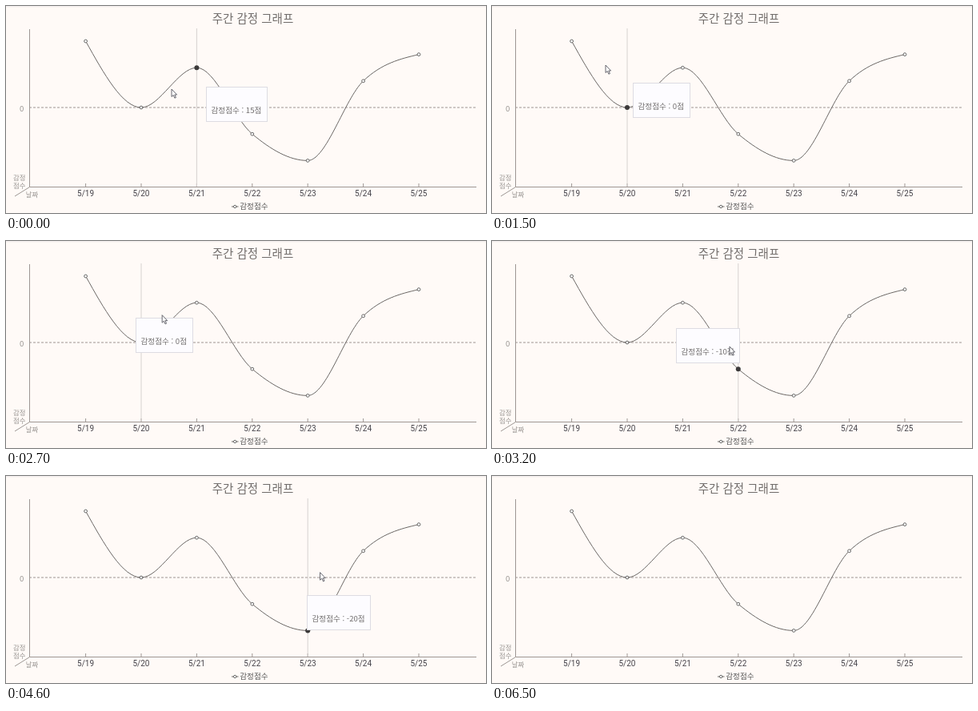
Recreate the animation shown at these times as an HTML page. Size 600 px wide and 259 px high, loop 6.6 s.

```html
<!DOCTYPE html>
<html lang="ko">
<head>
<meta charset="utf-8">
<title>주간 감정 그래프</title>
<style>
  html, body { margin: 0; width: 100%; height: 100%; overflow: hidden; background: #fffaf7; }
  svg { display: block; width: 600px; height: 259px; }
  text { font: 300 9.6px "Noto Sans CJK KR", "Noto Sans CJK", Roboto, sans-serif; fill: #555; }
  .mid { text-anchor: middle; }
  .title { font-size: 14.5px; fill: #706c6a; }
  .day { font: 400 10px Roboto, "Noto Sans", sans-serif; fill: #45434a; }
  .axis { font-size: 8.4px; fill: #979390; }
  .zero { font-size: 9.6px; }
  .line { fill: none; stroke: #6c6866; }
  .frame { fill: none; stroke: #9d9693; }
  .dot { fill: #fff; stroke: #666; }
  #tip text { fill: #716e6e; }
</style>
</head>
<body>
<svg viewBox="0 0 600 259">
  <rect width="600" height="1.5" fill="#f3efed"/>
  <text class="title mid" x="308.5" y="21.3">주간 감정 그래프</text>
  <path class="frame" d="M29.5 29V226.5H588M29.5 226.5L11 238"/>
  <path class="frame" d="M29 127H588" stroke-dasharray="3 2"/>
  <text class="axis zero mid" x="19.7" y="131.7">0</text>
  <text class="axis mid" x="16.7" y="218">감정</text>
  <text class="axis mid" x="16.7" y="228">점수</text>
  <text class="axis mid" x="32.5" y="239.3">날짜</text>
  <g id="days"></g>
  <path id="guide" stroke="#d6d2d0" d="M0 28V226"/>
  <path id="curve" class="line"/>
  <g id="dots"></g>
  <circle id="active" r="3" fill="#3c3a3a"/>
  <path class="line" d="M282 251H290.5"/>
  <circle class="dot" cx="286.2" cy="251" r="1.7"/>
  <text x="292.3" y="254.3">감정점수</text>
  <g id="tip">
    <rect x=".5" y=".5" height="43" fill="#fdfcff" stroke="#dddce2"/>
    <text x="6.5" y="32.5"></text>
  </g>
  <path id="mouse" d="M0 0V9.5L2.2 7.5L3.9 11.2L5.4 10.5L3.8 7H6.6Z" fill="#fff" stroke="#55555e" stroke-width=".9"/>
</svg>
<script>
const LOOP = 6600, STEP = 100, MOUSE_GONE = 6300;
const LEFT = 99.6, GAP = 69.4, TOP = 28, RIGHT = 588;
const OFFSET = 6, FOLLOW = 0.25;
const points = [25, 0, 15, -10, -20, 10, 20].map((score, i) =>
  ({ score, x: LEFT + GAP * i, y: 127 - 3.32 * score }));

// Mouse stops: ms, x, y
const stops = [
  [0, 207, 104], [200, 172, 98], [1400, 148, 87], [1500, 142, 74], [1700, 128, 48], [2000, 105, 40],
  [2200, 161, 106], [2800, 202, 90], [3200, 297, 132], [3900, 371, 172], [5100, 408, 84],
  [5200, 505, 65], [5800, 511, 50], [6200, 511, 6], [LOOP, 511, 6]
];

const $ = id => document.getElementById(id);
const [tipBox, tipText] = $("tip").children;
const place = (el, x, y) => el.setAttribute("transform", `translate(${x} ${y})`);
const show = (el, on) => { el.style.display = on ? "" : "none"; };

function mouseAt(t) {
  const i = stops.findIndex(s => s[0] > t);
  const [t0, x0, y0] = stops[i - 1], [t1, x1, y1] = stops[i];
  const f = (t - t0) / (t1 - t0);
  return { x: x0 + (x1 - x0) * f, y: y0 + (y1 - y0) * f };
}

const nearest = x => points[Math.max(0, Math.min(points.length - 1, Math.round((x - LEFT) / GAP)))];

function writeTip(point) {
  tipText.textContent = `감정점수 : ${point.score}점`;
  const width = Math.round(tipText.getComputedTextLength() + 13);
  tipBox.setAttribute("width", width);
  return width;
}

// Poses for each step; the tooltip eases towards its place beside the active point
function buildPoses() {
  const poses = [];
  const tip = { x: 250, y: 101 };
  for (let t = 0; t < LOOP; t += STEP) {
    const mouse = mouseAt(t), point = nearest(mouse.x), width = writeTip(point);
    poses.push({ mouse, point, tip: { ...tip } });
    const fits = point.x + OFFSET + width <= RIGHT;
    const goalX = fits ? point.x + OFFSET : point.x - OFFSET - width;
    tip.x += (goalX - tip.x) * FOLLOW;
    tip.y += (mouse.y + OFFSET - tip.y) * FOLLOW;
  }
  return poses;
}

// Monotone cubic through the points
function monotone(p) {
  const n = p.length - 1;
  const slope = p.slice(1).map((q, i) => (q.y - p[i].y) / (q.x - p[i].x));
  const m = p.map((_, i) => {
    if (i === 0 || i === n) return 0;
    const a = slope[i - 1], b = slope[i];
    return (Math.sign(a) + Math.sign(b)) * Math.min(Math.abs(a), Math.abs(b), Math.abs(a + b) / 4);
  });
  m[0] = (3 * slope[0] - m[1]) / 2;
  m[n] = (3 * slope[n - 1] - m[n - 1]) / 2;
  let d = `M${p[0].x} ${p[0].y}`;
  for (let i = 0; i < n; i++) {
    const a = p[i], b = p[i + 1], h = (b.x - a.x) / 3;
    d += `C${a.x + h} ${a.y + h * m[i]} ${b.x - h} ${b.y - h * m[i + 1]} ${b.x} ${b.y}`;
  }
  return d;
}

$("curve").setAttribute("d", monotone(points));
$("days").innerHTML = points.map((p, i) =>
  `<path class="frame" d="M${p.x} 222V226"/><text class="day mid" x="${p.x}" y="237.6">5/${19 + i}</text>`).join("");
$("dots").innerHTML = points.map(p => `<circle class="dot" cx="${p.x}" cy="${p.y}" r="1.9"/>`).join("");

const poses = buildPoses();

function draw(time) {
  const t = time % LOOP;
  const { mouse, point, tip } = poses[Math.floor(t / STEP)];
  for (const id of ["guide", "active", "tip"]) show($(id), mouse.y >= TOP);
  show($("mouse"), t < MOUSE_GONE);
  place($("mouse"), mouse.x, mouse.y);
  place($("guide"), point.x, 0);
  place($("active"), point.x, point.y);
  place($("tip"), Math.round(tip.x), Math.round(tip.y));
  writeTip(point);
}

const start = performance.now();
function tick() {
  draw(performance.now() - start);
  requestAnimationFrame(tick);
}
tick();
</script>
</body>
</html>
```
